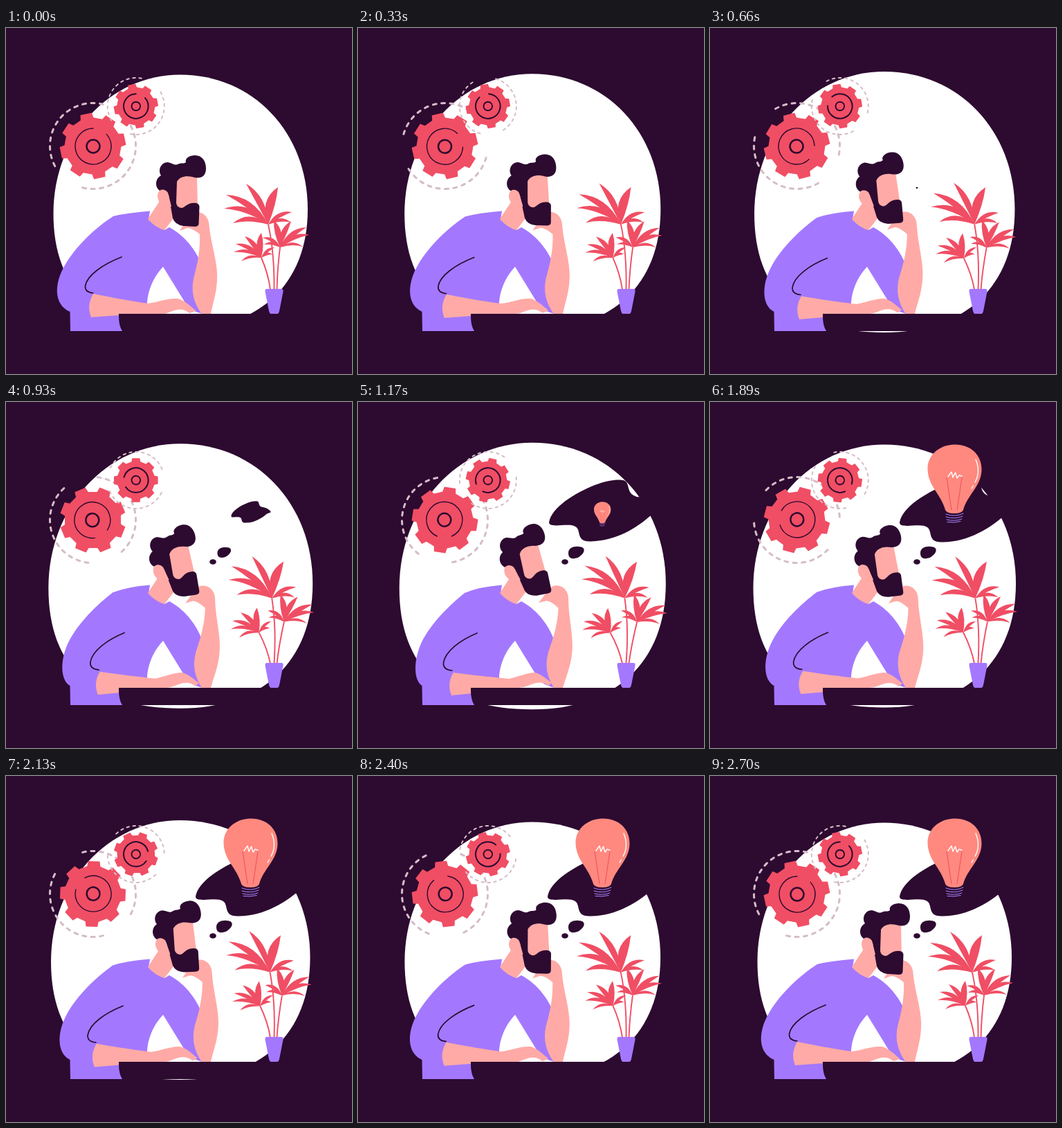
These frames come from a looping animation (500 px wide and 500 px high, 2760 ms). An HTML page:

```html
<!DOCTYPE html>
<html lang="en">
<head>
<meta charset="utf-8">
<title>Thinking man</title>
<style>
html, body { margin: 0; width: 100%; height: 100%; overflow: hidden; background: #2d0a30; }
svg { display: block; width: 100vw; height: 100vh; }
.dark { fill: #2d0a30; }
.skin { fill: #ffaaa6; }
.shirt { fill: #a378ff; }
.red { fill: #f04e64; }
.line { fill: none; stroke: #2d0a30; stroke-linecap: round; }
.dash { fill: none; stroke: #d5bcc8; stroke-linecap: round; }
.stem { fill: none; stroke: #f04e64; stroke-width: 1.9; }
.white { fill: none; stroke: #fff; stroke-width: 1.4; stroke-linecap: round; stroke-linejoin: round; }
</style>
</head>
<body>
<svg viewBox="0 0 500 500">
  <rect class="dark" width="500" height="500"/>
  <path id="blob" fill="#fff" d="M252 67.500C357 67.500 436 151 436 262C436 370 366 435.500 252 435.500C131 435.500 68.500 378 68.500 268C68.500 156 149 67.500 252 67.500Z"/>
  <g id="bigGear"></g>
  <g id="smallGear"></g>
  <g id="plants"></g>
  <path class="shirt" d="M377 377H398Q401 377 400.500 381L395 409Q394 413.500 390 413.500H385Q381 413.500 380 409L374.500 381Q374 377 377 377Z"/>
  <g class="dark">
    <ellipse id="dot1" cx="299" cy="231" rx="4.800" ry="3.800" />
    <path id="dot2" d="M304 218C304 211 312 208 319 209C326 209 328 213 326 217C322 224 315 227 309 226C305 225 304 222 304 218Z"/>
    <path id="cloud" d="M274 174C278 152 312 131 342 119C362 111 378 110 385 112C394 115 389 128 399 134Q404 137 409 137C425 140 440 150 442 158L424 165C405 182 372 203 335 202.500C314 203 322 187 314 181C306 175 286 181 277 178Q274 177 274 174Z"/>
  </g>
  <g id="bulb">
    <path fill="#ff897f" d="M353 61.500C378 61 393 78 392.500 98C392 122 372 134 366 156Q364 161 353 161Q342 161 340 156C334 133 315 122 314.500 97C314 78 330 62 353 61.500Z"/>
    <path fill="none" stroke="#ee5566" stroke-width="1.200" d="M342 109L349 156M364 109L357 156"/>
    <path class="white" d="M344 108L349 101L351 109L354.500 102L357 110L360 106L364 107M384 83C389 95 388 107 383 116M380.500 121L378 125"/>
    <path fill="none" stroke="#a98aff" stroke-linecap="round" d="M341 162Q354 167 366 161M341 166Q354 170 365 165M342 170Q354 173 364 169M343 173.500Q353 175 362 172.500"/>
  </g>
  <path id="body" class="shirt"/>
  <path id="fold" class="line" stroke-width="1.700"/>
  <path id="foreArm" class="skin"/>
  <path id="chinArm" class="skin" d="M283 418L282 412C272 398 267 382 271 362C277 340 281 320 280 298C275 294 268 289 262 289L251 293L258 282L268 268C280 262 291 270 293 281L295 297C300 325 306.500 345 305 365C304 385 298 400 295 418Z"/>
  <path class="skin" d="M224 247L205 276Q215 288 229 292L246 270L238 240Z"/>
  <g id="head">
    <path class="skin" d="M232 240L247 214H276L277 262L245 275Z"/>
    <path class="dark" d="M222 235C215 230 215 218 224 213C219 205 224 194 234 194C240 195 243 199 248 197C253 194 257 197 260 194C258 188 266 184 273 184C284 184 289 193 289 203C289 214 282 218 272 216C264 213 252 213 247 222L246 252C246 257 250 260 254 260C259 259 261 254 269 253Q279 252 279.500 258L278.500 283Q278 287 273 287L256 286Q244 284 241 275L235 241Z"/>
    <path class="skin" d="M220 238C222 232 230 232 234 238L239 258H227C221 252 217 245 220 238Z"/>
  </g>
  <path class="dark" d="M163 413H400V438H168Q163 430 163 417Z"/>
</svg>
<script>
const $ = id => document.getElementById(id);
const LAST = 2700, STEP = 30, LOOP = 2760;

const polar = (r, deg) => {
  const a = deg * Math.PI / 180;
  return (r * Math.cos(a)).toFixed(2) + ' ' + (r * Math.sin(a)).toFixed(2);
};
const arc = (r, from, sweep) =>
  `M${polar(r, from)}A${r} ${r} 0 ${sweep > 180 ? 1 : 0} 1 ${polar(r, from + sweep)}`;

function cog(root, tip, turn) {
  let d = '';
  for (let k = 0; k < 8; k++) {
    const a = turn + k * 45;
    const pts = [polar(root, a - 13.5), polar(tip, a - 10), polar(tip, a + 10)];
    d += (k ? 'L' : 'M') + pts.join('L') + `L${polar(root, a + 13.5)}`;
  }
  return d + 'Z';
}

function gear(o) {
  return `<path class="dash" stroke-width="${o.dashWidth}" stroke-dasharray="${o.dash}"
      d="${arc(o.orbit, o.gap + 22, 136)}${arc(o.orbit, o.gap + 202, 136)}"/>
    <path class="red" d="${cog(o.root, o.tip, o.turn)}"/>
    <g transform="translate(${o.shift} ${o.shift})">
      <path class="line" stroke-width="${o.ringWidth}" d="${arc(o.ring, -42, 312)}"/>
      <circle class="line" stroke-width="${o.hubWidth}" r="${o.hub}"/>
    </g>`;
}
$('bigGear').innerHTML = gear({ orbit: 62, gap: 130, dash: '5 7.5', dashWidth: 3, root: 41, tip: 48,
  turn: -12, ring: 26, ringWidth: 1.4, hub: 9.5, hubWidth: 2.5, shift: 0.5 });
$('smallGear').innerHTML = gear({ orbit: 41, gap: 128, dash: '3.5 5.5', dashWidth: 2, root: 27.5, tip: 32.3,
  turn: -11, ring: 17.8, ringWidth: 2, hub: 6.3, hubWidth: 1.9, shift: 0 });

// A leaf bows by `bend` off the straight line from base to tip.
function leaf(bx, by, [tx, ty, bend, w]) {
  const dx = tx - bx, dy = ty - by, len = Math.hypot(dx, dy);
  const ctrl = k => `${(bx + dx * 0.55 - dy / len * k).toFixed(1)} ${(by + dy * 0.55 + dx / len * k).toFixed(1)}`;
  return `M${bx} ${by}Q${ctrl(bend + w)} ${tx} ${ty}Q${ctrl(bend - w)} ${bx} ${by}Z`;
}
const plants = [
  { base: [379, 284], root: [388, 377], sway: 4.1, stem: 'M379 284Q388 325 387.5 378',
    leaves: [[393, 230, -9, 13], [347, 225, 9, 9], [318, 241, 13, 9], [315, 261, 17, 8],
      [328, 282, 14, 7], [413, 266, -8, 6], [412, 281, -10, 5]] },
  { base: [369, 332], root: [382, 377], sway: -5.8, stem: 'M369 332Q379 355 382 378',
    leaves: [[369, 296, -4, 9], [345, 301, 6, 7], [332, 312, 8, 6], [329, 324, 10, 5],
      [340, 337, 8, 4], [388, 317, -5, 4], [385, 327, -6, 4]] },
  { base: [396, 317], root: [391, 377], sway: 7.2, stem: 'M396 317Q392 350 391.5 378',
    leaves: [[387, 278, 4, 9], [412, 279, -6, 8], [434, 288, -8, 7], [438, 299, -10, 6],
      [429, 316, -9, 4], [371, 303, 7, 5], [373, 313, 7, 4]] }
];
$('plants').innerHTML = plants.map(p =>
  `<g><path class="stem" d="${p.stem}"/><path class="red" d="${p.leaves.map(l => leaf(...p.base, l)).join('')}"/></g>`).join('');

const poses = {
  body: [
    'M155 272Q175 267 208 264.5L206 277L229 292L236 288C262 302 277 326 284 345L275 370L284 413Q268 409 262 402L227 345C210 363 204 385 204 400L204 438L93 438L92.500 410C69 400 69 370 85 343C101 315 130 288 155 272Z',
    'M154 276Q175 267 208 264.5L206 277L229 292L236 288C262 302 277 326 284 345L275 370L284 413Q268 409 262 402L227 345C210 363 204 385 204 400L204 438L93 438L92.500 410C80 402 80 372 92 347C106 319 132 294 154 276Z'],
  fold: ['M167 331C141 341 117 357 114.500 373Q114 382 126 383', 'M172 334C148 344 126 360 123.500 377Q123 387 136 388'],
  foreArm: [
    'M126 384C165 392 190 396 205 398C220 396 235 390 248 391C258 393 266 402 274 408L272 410L265 412C252 402 243 409 230 413L165 415L123 418C118 405 120 395 126 384Z',
    'M138 391C175 396 200 398 218 400C232 397 245 391 256 391C266 394 272 400 280 406L277 408L277 411C264 401 255 407 240 412L165 421L135 424C130 411 132 400 138 391Z']
};
const mix = ([a, b], k) => {
  const end = b.match(/[\d.]+/g);
  let i = 0;
  return a.replace(/[\d.]+/g, n => (+n + (end[i++] - n) * k).toFixed(2));
};

const move = (id, v) => $(id).setAttribute('transform', v);
const zoom = (id, x, y, s) => move(id, `translate(${x} ${y}) scale(${s}) translate(${-x} ${-y})`);
const grow = (t, from, span) => {
  const u = Math.min(1, Math.max(0, (t - from) / span));
  return u * (2 - u);
};

function draw(t) {
  const angle = t / LAST * 360;
  const lean = (1 - Math.cos(angle * Math.PI / 180)) / 2;
  zoom('blob', 252, 251.5, 1 + 0.05 * lean);
  move('bigGear', `translate(125.5 170.5) rotate(${angle})`);
  move('smallGear', `translate(187.8 113) rotate(${-angle})`);
  plants.forEach((p, i) =>
    $('plants').children[i].setAttribute('transform', `rotate(${p.sway * lean} ${p.root})`));
  move('head', `rotate(${-15 * lean} 232 274)`);
  move('chinArm', `rotate(${5 * lean} 289 412)`);
  for (const id in poses) $(id).setAttribute('d', mix(poses[id], lean / 0.957));
  zoom('dot1', 299, 231, grow(t, 610, 300));
  zoom('dot2', 315, 217, grow(t, 740, 300));
  zoom('cloud', 352, 160, grow(t, 860, 370));
  zoom('bulb', 353, 182, grow(t, 1110, 350));
}

function tick() {
  const t = performance.now() % LOOP;
  draw(Math.min(LAST, Math.floor(t / STEP) * STEP));
  requestAnimationFrame(tick);
}
tick();
</script>
</body>
</html>
```
